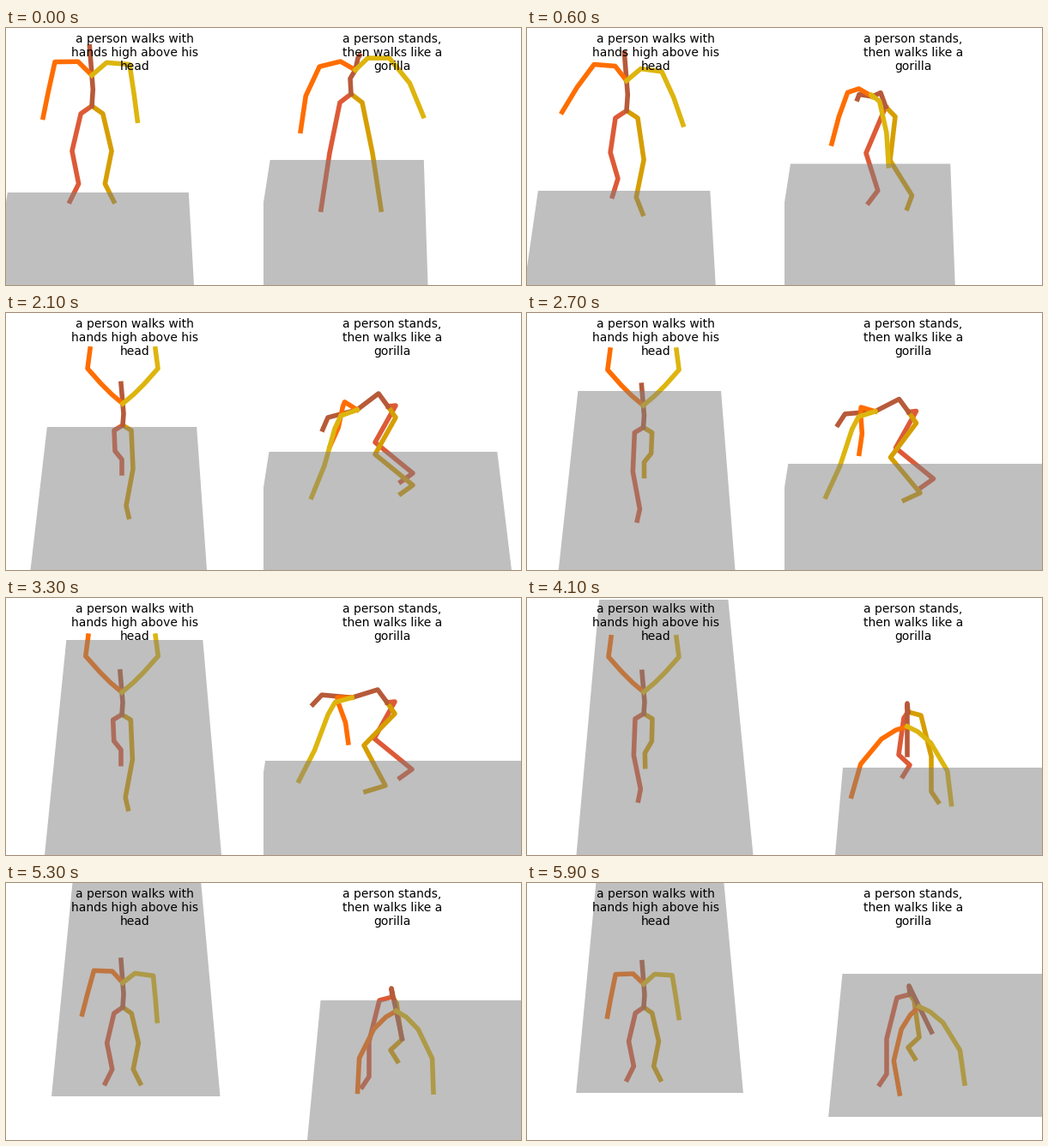
Write a matplotlib script that moves like this. It is 600 px wide and 300 px high and loops after 6000 ms.

```python
import numpy as np
import matplotlib.pyplot as plt
from matplotlib.animation import FuncAnimation
from matplotlib.patches import Polygon

W, H, DPI = 600, 300, 100
FRAMES, STEP = 60, 100
KEYS = [0, 1.2, 2.1, 3.3, 4.1, 5.3, 5.9]   # seconds at which tracks have values
VANISH_X, VANISH_Y = 156, -800             # where the floor's sides meet

# Joint order: root, right leg, left leg, spine, right arm, left arm.
# Joint 10 is the chest, where the arms start.
CHAINS = [
    ("#DD5A37", [0, 1, 2, 3, 4]),
    ("#D69E00", [0, 5, 6, 7, 8]),
    ("#B75A39", [0, 9, 10, 11, 12]),
    ("#FF6D00", [10, 13, 14, 15, 16]),
    ("#DDB50E", [10, 17, 18, 19, 20]),
]


def track(t, *values):
    return np.interp(t, KEYS, values)


def points(*xy):
    return np.array(xy, float)


def mix(a, b, w):
    return a + (b - a) * w


def stages(level, *poses):
    """Blend neighbouring poses; level 0 is the first, 1 the second, ..."""
    i = min(int(level), len(poses) - 2)
    return mix(poses[i], poses[i + 1], level - i)


def mirror(limb):
    return limb * [-1, 1]


def turn(pts, degrees):
    """Rotate; a positive angle swings hanging points to the right."""
    a = np.radians(degrees)
    return pts @ np.array([[np.cos(a), -np.sin(a)], [np.sin(a), np.cos(a)]])


def body(spine, legs, arms, lean=0, tilts=(0, 0)):
    back = spine[0]
    spine = np.vstack([back, back + turn(spine[1:] - back, lean)])
    arms = [spine[1] + turn(arm, tilt) for arm, tilt in zip(arms, tilts)]
    return np.vstack([[0, 0], *legs, spine, *arms])


# Limbs of the left side, relative to root or chest; the right side mirrors them.
UPRIGHT = points((1, -15), (0, -28), (-1, -41), (-2, -54))
LEG_STAND = points((10, 7), (18, 41), (12, 71), (20, 87))
LEG_DOWN = points((10, 6), (12, 51), (4, 94), (7, 107))
LEG_UP = points((10, 6), (9, 30), (1, 40), (1, 56))
ARM_LOW = points((13, -12), (34, -11), (39, 16), (43, 40))
ARM_WIDE = points((10, -12), (27, -12), (48, 5), (66, 28))
ARM_HIGH = points((13, -11), (25, -23), (41, -41), (38, -64))


def walker(t):
    walking = track(t, 0, 0.8, 1, 1, 1, 0, 0)
    lift = np.clip(0.5 + 1.5 * np.cos(2 * np.pi * (t - 2.05) / 1.2), 0, 1)
    right, left = (mix(LEG_STAND, mix(LEG_DOWN, LEG_UP, w), walking)
                   for w in (lift, 1 - lift))
    arm = stages(track(t, 0, 1, 2, 2, 2, 0, 0), ARM_LOW, ARM_WIDE, ARM_HIGH)
    tilt = track(t, -2, -10, 0, 0, 0, -5, -1)
    spine = UPRIGHT * [1, 1 - 0.1 * walking]
    joints = body(spine, (mirror(right), left), (mirror(arm), arm),
                  tilts=(tilt, tilt))
    root = [track(t, 100, 132, 136, 135, 136, 136, 136),
            track(t, 91, 102, 131, 136, 135, 145, 145)]
    return root + joints * track(t, 1.28, 1.32, 1, 1.03, 1, 1.02, 0.97)


def walker_floor(t):
    return (track(t, 192, 188, 133, 49, 2, -40, -45),
            track(t, 330, 330, 330, 330, 330, 249, 245),
            track(t, -15, 9, 28.5, 45, 57.5, 48, 52),
            track(t, 219, 220.5, 234, 251, 263.5, 254, 257))


# Gorilla walk: upright, then bent over in side view, then bent over from behind.
TALL = points((-1, -18), (5, -28), (8, -42), (10, -45))
TALL_LEG = points((13, 10), (25, 69), (32, 115), (35, 135))
TALL_ARM = points((16, -12), (41, -9), (61, 23), (72, 63))
BENT = points((-11, -15), (-36, 4), (-70, 13), (-76, 27))
BENT_LEG_BACK = points((9, 6), (-15, 49), (29, 85), (15, 95))
BENT_LEG_FRONT = points((9, 6), (-27, 43), (-2, 90), (-25, 97))
BENT_ARM_FAR = points((-16, -6), (-17, 0), (-17, 25), (-22, 48))
BENT_ARM_NEAR = points((-19, 7), (-26, 22), (-38, 65), (-53, 102))
REAR = points((-1, -10), (-1, 17), (-1, 34), (-1, 50))
REAR_LEG_DOWN = points((15, 4), (27, 52), (27, 93), (35, 105))
REAR_LEG_UP = points((5, 7), (11, 50), (-2, 62), (6, 75))
REAR_ARM = points((12, 7), (26, 21), (43, 55), (45, 94))


def gorilla(t):
    lifts = track(t, 0, 1, 0, 0, 1, 0, 0), track(t, 0, 0, 0, 1, 0, 1, 1)
    tilts = (track(t, 7, -8, -12, 20, -13, 0, 13),
             track(t, 7, 6, 0, -5, 4, -1, 5))
    lean = track(t, 0, 0, 0, -20, 0, 12, 26)
    far, near = (mix(BENT_LEG_BACK, BENT_LEG_FRONT, w) for w in lifts)
    right, left = (mix(REAR_LEG_DOWN, REAR_LEG_UP, w) for w in lifts)
    tall = body(TALL, (mirror(TALL_LEG), TALL_LEG),
                (mirror(TALL_ARM), TALL_ARM), lean, tilts)
    bent = body(BENT, (far - [0, 7], near + [0, 7]),
                (BENT_ARM_FAR, BENT_ARM_NEAR), lean, tilts)
    rear = body(REAR, (mirror(right), left),
                (mirror(REAR_ARM), REAR_ARM), lean, tilts)
    root = [track(t, 102, 134, 145, 144, 144, 150, 146),
            track(t, 77, 107, 109, 122, 133, 133, 130)]
    return root + stages(track(t, 0, 1, 1, 1, 2, 2, 2), tall, bent, rear)


def gorilla_floor(t):
    return (track(t, 154, 163, 162, 190, 198, 137, 106),
            track(t, 350, 350, 350, 350, 350, 313, 273),
            track(t, -15, -15, -15, -15, 59, 51, 48.5),
            track(t, 191.5, 206, 289, 380, 420, 420, 420))


class Panel:
    """Half of the stage: a stick figure, and a floor seen through haze."""

    def __init__(self, x0, caption, joints, floor):
        ax = fig.add_axes([x0 / W, 0, 0.5, 1])
        ax.set(xlim=(0, W / 2), ylim=(H, 0))
        ax.axis("off")
        self.joints, self.floor = joints, floor
        self.limbs = [ax.plot([], [], color=c, lw=4, zorder=2)[0]
                      for c, _ in CHAINS]
        self.plane = Polygon(np.zeros((4, 2)), facecolor=(0.5, 0.5, 0.5, 0.5),
                             edgecolor="none", zorder=3)
        ax.add_patch(self.plane)
        ax.text(W / 4, 0.02 * H, caption, fontsize=10, ha="center",
                va="top", zorder=4)

    def draw(self, t):
        joints = self.joints(t)
        for line, (_, chain) in zip(self.limbs, CHAINS):
            line.set_data(joints[chain].T)
        # Sides are given by where they cross the lower stage border.
        top, bottom, left, right = self.floor(t)

        def corner(x, y):
            depth = (y - VANISH_Y) / (H - VANISH_Y)
            return VANISH_X + (x - VANISH_X) * depth, y

        self.plane.set_xy([corner(left, top), corner(right, top),
                           corner(right, bottom), corner(left, bottom)])


plt.rcParams["font.family"] = "DejaVu Sans"
fig = plt.figure(figsize=(W / DPI, H / DPI), dpi=DPI, facecolor="white")
panels = [
    Panel(0, "a person walks with\nhands high above his\nhead",
          walker, walker_floor),
    Panel(300, "a person stands,\nthen walks like a\ngorilla",
          gorilla, gorilla_floor),
]


def update(i):
    for panel in panels:
        panel.draw(i * STEP / 1000)
    return []


anim = FuncAnimation(fig, update, frames=FRAMES, interval=STEP, repeat=True,
                     repeat_delay=0, blit=False)
plt.show()
```
